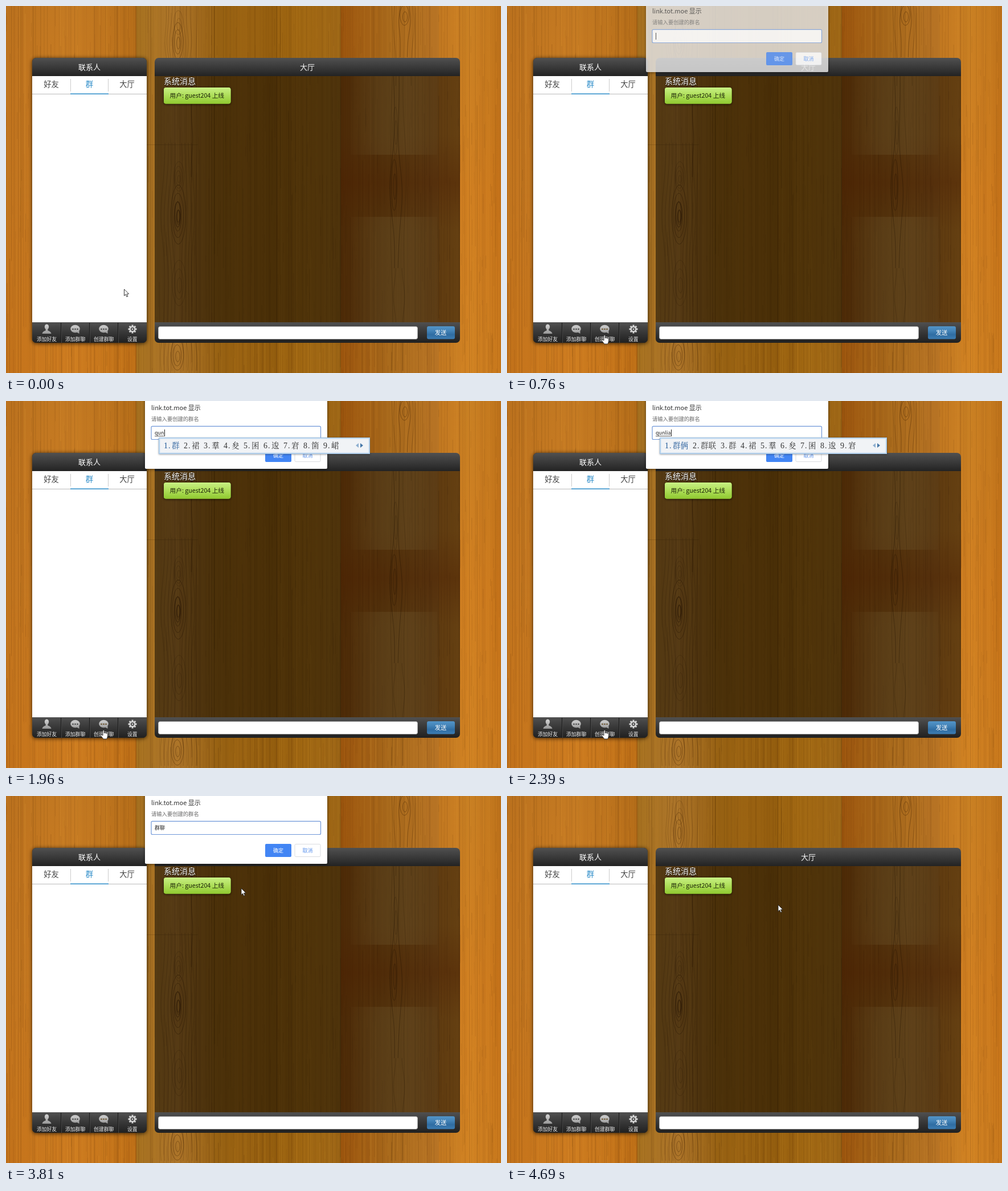
An HTML page with a canvas that plays this animation: 869 by 644 pixels, repeating every 6.33 s.

```html
<!DOCTYPE html>
<html lang="zh-CN">
<head>
<meta charset="utf-8">
<title>群聊</title>
<style>
html, body { margin: 0; width: 100%; height: 100%; overflow: hidden; background: #a5681a; }
canvas { display: block; }
</style>
</head>
<body>
<canvas id="stage" width="869" height="644"></canvas>
<script>
const W = 869, H = 644, LOOP = 6330;
const SANS = '"Noto Sans CJK SC", "Noto Sans", sans-serif';
const SERIF = '"Liberation Serif", "Noto Sans CJK SC", serif';
const view = document.getElementById('stage').getContext('2d');
let g = view;

let seed = 7;
const rnd = () => (seed = (seed * 16807) % 2147483647) / 2147483647;

function rect(x, y, w, h, fill) {
  g.fillStyle = fill;
  g.fillRect(x, y, w, h);
}

function round(x, y, w, h, r, fill, stroke) {
  g.beginPath();
  g.roundRect(x, y, w, h, r);
  if (fill) { g.fillStyle = fill; g.fill(); }
  if (stroke) { g.strokeStyle = stroke; g.stroke(); }
}

function ramp(x0, y0, x1, y1, ...stops) {
  const r = g.createLinearGradient(x0, y0, x1, y1);
  stops.forEach((s, i) => Array.isArray(s) ? r.addColorStop(s[0], s[1]) : r.addColorStop(i / (stops.length - 1), s));
  return r;
}

function shadow(color, blur, dy, draw) {
  g.save();
  g.shadowColor = color;
  g.shadowBlur = blur;
  g.shadowOffsetY = dy;
  draw();
  g.restore();
}

// y is the optical centre of the line
function text(str, x, y, size, color, align = 'left', font = SANS) {
  g.font = size + 'px ' + font;
  g.textAlign = align;
  g.fillStyle = color;
  g.fillText(str, x, y + size * 0.38);
}

function poly(points, fill, stroke) {
  g.beginPath();
  for (let i = 0; i < points.length; i += 2) g.lineTo(points[i], points[i + 1]);
  g.closePath();
  if (fill) { g.fillStyle = fill; g.fill(); }
  if (stroke) { g.strokeStyle = stroke; g.stroke(); }
}

// Grain lines that bulge around a knot, with rings inside it
function knot(cx, cy, rx, ry, rings, color) {
  g.strokeStyle = color;
  g.lineWidth = 0.9;
  for (let i = 1; i <= rings; i++) {
    const k = i / rings;
    g.beginPath();
    g.ellipse(cx + Math.sin(i * 2) * 0.6, cy - k * 6, rx * k, ry * k, 0, 0, Math.PI * 2);
    g.stroke();
  }
}

function strand(x, y0, y1, bulge, cy, spread, color) {
  g.strokeStyle = color;
  g.lineWidth = 0.9;
  g.beginPath();
  for (let y = y0; y <= y1; y += 5)
    g.lineTo(x + bulge * Math.exp(-(((y - cy) / spread) ** 2)) + Math.sin(y / 37 + x) * 1.2, y);
  g.stroke();
}

function wood() {
  const planks = [
    [0, 229, '#bf741f', '#cb7f25', '#b9701a'],
    [229, 365, '#a5701f', '#ad752a', '#986215'],
    [365, 476, '#956012', '#9b6312', '#935d0e'],
    [476, 588, '#99610f', '#a16813', '#9c6516'],
    [588, 760, '#9d560e', '#a96a1c', '#b87425'],
    [760, 869, '#c17720', '#cf8325', '#c3751c']
  ];
  for (const [a, b, ...c] of planks) rect(a, 0, b - a, H, ramp(a, 0, b, 0, ...c));
  rect(0, 0, 229, H, ramp(0, 0, 0, H, 'rgba(150,90,20,.12)', 'rgba(225,115,15,.05)', 'rgba(215,110,10,.2)'));
  rect(797, 0, 72, H, ramp(0, 0, 0, H, 'rgba(150,100,20,.1)', 'rgba(230,110,10,.12)', 'rgba(220,130,25,.15)'));
  for (let x = 0; x < W; x += 1.5) {
    const dark = rnd() < 0.6;
    const y = rnd() < 0.5 ? 0 : rnd() * H;
    rect(x, y, 0.6 + rnd(), H * (0.4 + rnd()), dark ? `rgba(70,35,0,${rnd() * 0.17})` : `rgba(255,190,80,${rnd() * 0.1})`);
  }
  for (let i = 0; i < 700; i++)
    rect(rnd() * W, rnd() * H, 0.8, 10 + rnd() * 55, `rgba(70,35,0,${rnd() * 0.15})`);
  for (const x of [228, 365, 475, 587]) rect(x, 0, 1, H, 'rgba(60,30,0,.25)');
  rect(247, 243, 90, 1, 'rgba(70,40,0,.22)');
  rect(588, 225, 209, 170, ramp(0, 225, 0, 395, 'rgba(150,55,0,0)', 'rgba(150,55,0,.32)', 'rgba(150,55,0,0)'));
  for (const [y, h] of [[91, 170], [370, 190]])
    rect(605, y, 152, h, ramp(605, 0, 757, 0, 'rgba(210,160,80,.05)', 'rgba(215,165,85,.32)', 'rgba(215,165,85,.38)', 'rgba(215,165,85,.12)'));

  const ink = 'rgba(65,32,0,.45)', soft = 'rgba(65,32,0,.25)';
  knot(302, 372, 13, 52, 4, ink);
  knot(302, 372, 5, 22, 2, 'rgba(50,22,0,.6)');
  knot(302, 67, 9, 32, 3, ink);
  knot(303, 35, 8, 21, 2, soft);
  knot(301, 617, 11, 28, 3, ink);
  knot(303, 305, 9, 26, 4, soft);
  knot(304, 492, 12, 40, 3, soft);
  for (let i = 1; i <= 4; i++) {
    strand(302 - i * 6, 240, 560, -5, 372, 60, soft);
    strand(302 + i * 6, 240, 560, 5, 372, 60, soft);
    strand(302 + i * 5, 0, 100, 4, 65, 30, soft);
    strand(302 - i * 5, 0, 100, -4, 65, 30, soft);
    strand(302 + i * 7, 560, H, 4, 617, 35, soft);
    strand(302 - i * 7, 560, H, -4, 617, 35, soft);
  }
  strand(325, 120, 300, 4, 235, 35, ink);
  strand(335, 0, H, -3, 430, 70, soft);

  knot(682, 320, 5, 45, 2, ink);
  knot(684, 225, 4, 42, 2, soft);
  knot(700, 22, 8, 18, 2, ink);
  for (const s of [-1, 1]) {
    strand(685 + s * 4, 120, 460, s * 6, 320, 60, ink);
    strand(688 + s * 10, 0, H, s * 4, 320, 90, soft);
    strand(699 + s * 6, 0, 91, s * 4, 25, 26, ink);
    strand(690 + s * 5, 460, H, s * 6, 510, 35, soft);
    strand(698 + s * 14, 0, 140, s * 4, 40, 40, soft);
  }
}

const bar = y => ramp(0, y, 0, y + 32, '#505050', '#3a3a3a', '#232323');

function person(x, y, fill) {
  g.fillStyle = fill;
  g.beginPath();
  g.ellipse(x, y - 4, 3.7, 4.6, 0, 0, 7);
  g.fill();
  rect(x - 1.8, y - 1, 3.6, 5, fill);
  g.beginPath();
  g.moveTo(x - 8, y + 8);
  g.quadraticCurveTo(x - 7.5, y + 4, x - 2, y + 2.5);
  g.lineTo(x + 2, y + 2.5);
  g.quadraticCurveTo(x + 7.5, y + 4, x + 8, y + 8);
  g.fill();
}

function bubble(x, y, fill, dots) {
  g.fillStyle = fill;
  g.beginPath();
  g.ellipse(x, y - 0.5, 8.3, 6.7, 0, 0, 7);
  g.fill();
  poly([x + 2, y + 5, x + 7, y + 3, x + 7, y + 8], fill);
  for (const d of [-4, 0, 4]) rect(x + d - 1, y - 1, 2, 2, dots);
}

function gear(x, y, fill) {
  g.save();
  g.translate(x, y);
  for (let i = 0; i < 8; i++) {
    rect(-1.5, -7.5, 3, 4, fill);
    g.rotate(Math.PI / 4);
  }
  g.strokeStyle = fill;
  g.lineWidth = 2.4;
  g.beginPath();
  g.arc(0, 0, 4.3, 0, 7);
  g.stroke();
  g.beginPath();
  g.arc(0, 0, 1.5, 0, 7);
  g.fill();
  g.restore();
}

function contacts() {
  shadow('rgba(0,0,0,.75)', 7, 1, () => round(46, 91, 201, 500, 7, '#222'));
  round(46, 91, 201, 32, [7, 7, 0, 0], bar(91));
  rect(46, 123, 201, 432, '#fff');
  text('联系人', 146.5, 107, 13, '#fff', 'center');
  text('好友', 79.5, 137, 13.3, '#444', 'center');
  text('群', 146.3, 137, 13.3, '#2b8bc8', 'center');
  text('大厅', 212.5, 137, 13.3, '#444', 'center');
  rect(113, 128, 1, 22, '#ccc');
  rect(179, 128, 1, 22, '#ccc');
  rect(46, 154, 201, 1, '#bbb');
  rect(113, 153.5, 67, 1.5, '#2b8bc8');

  round(46, 555, 201, 36, [0, 0, 7, 7], ramp(0, 555, 0, 591, '#505050', '#373737', '#202020'));
  for (const x of [96, 146, 196]) {
    rect(x, 556, 1, 35, '#1b1b1b');
    rect(x + 1, 556, 1, 35, '#484848');
  }
  const tone = ramp(0, 559, 0, 576, '#d2d2d2', '#949494');
  person(71.5, 567, tone);
  bubble(121.5, 567, tone, '#333');
  bubble(171.5, 567, tone, '#333');
  gear(222, 567, tone);
  ['添加好友', '添加群聊', '创建群聊', '设置'].forEach((s, i) => text(s, 71.5 + i * 50.1, 585, 8.8, '#eee', 'center'));
}

function chat() {
  rect(261, 123, 536, 432, 'rgba(0,0,0,.5)');
  round(261, 91, 536, 32, [7, 7, 0, 0], bar(91));
  text('大厅', 529, 107, 13, '#f4f4f4', 'center');
  shadow('#000', 2, 1, () => text('系统消息', 277, 132, 14, '#fff'));
  shadow('rgba(0,0,0,.7)', 4, 1, () => round(277, 143, 117.5, 28.5, 4, '#9c3'));
  round(277, 143, 117.5, 28.5, 4, ramp(0, 143, 0, 171, '#c8f084', '#aede59', '#91ca32'));
  text('用户: guest204 上线', 287.5, 157.3, 10.7, '#1c2408');
  round(261, 555, 536, 36, [0, 0, 7, 7], ramp(0, 555, 0, 591, '#505050', '#373737', '#202020'));
  g.lineWidth = 1;
  round(267.5, 562.5, 455, 22, 3, '#fff', '#aaa');
  round(739, 562, 49, 22.5, 3, ramp(0, 562, 0, 584, '#5294c8', '#4585b9', '#2f6da3', '#3c7cb2'));
  text('发送', 763, 573.3, 10.3, '#fff', 'center');
}

function buildScene() {
  const c = document.createElement('canvas');
  c.width = W;
  c.height = H;
  g = c.getContext('2d');
  wood();
  contacts();
  chat();
  g = view;
  return c;
}

// Value of the last step at or before t
const at = (steps, t) => steps.reduce((v, s) => s[0] <= t ? s : v, steps[0]);

// time, opacity, vertical offset
const FADE = [[0, 0, 0], [650, 0.04, -10], [760, 0.75, -3], [870, 1, 0], [4490, 0.99, -2.6], [4590, 0.25, -8], [4690, 0, 0]];

// time, typed text, candidates
const TYPING = [
  [0, '', ''],
  [1630, 'q', '去 前 请 起 其实 全 却 其他 群'],
  [1730, 'qu', '去 区 取 曲 趣 渠 屈 驱 娶'],
  [1960, 'qun', '群 裙 羣 夋 囷 逡 宭 箘 峮'],
  [2160, 'qunl', '群里 群落 群龙 群狼 群岭 群乱 群雷 群楼 群林'],
  [2270, 'qunli', '群里 群力 群立 群离 群 裙 羣 夋 囷'],
  [2380, 'qunlia', '群俩 群联 群 裙 羣 夋 囷 逡 宭'],
  [2490, 'qunliao', '群聊 群僚 群撩 裙撩 群寥 群疗 群 裙 羣'],
  [3030, '群聊', '']
];

// time, caret shown
const CARET = [[0, 1], [1200, 0], [1630, 1], [3470, 0], [3930, 1], [4370, 0]];

// time, x, y, hand
const POINTER = [
  [0, 207.5, 497, 0], [100, 196, 522, 0], [210, 176, 566, 1], [310, 170, 577.5, 1],
  [3250, 190, 545, 0], [3360, 235, 470, 0], [3470, 290, 380, 0], [3590, 348, 275, 0], [3700, 392, 195, 0], [3810, 413, 162, 0],
  [3930, 432, 138, 0], [4040, 452, 115, 0], [4150, 466, 100, 0], [4260, 472, 95, 0], [4370, 473, 93.5, 0],
  [4590, 474, 112, 0], [4690, 476, 191, 0]
];

function picker(words) {
  const list = words.split(' ');
  const wide = 54 + list.length * 35 + (words.replace(/ /g, '').length - list.length) * 14;
  shadow('rgba(0,0,0,.35)', 3, 1, () => rect(268, 64, wide + 2, 29, '#9fc3e6'));
  rect(269, 65, wide, 27, '#c5dcf1');
  rect(270.5, 66.5, wide - 3, 24, '#f1f3f6');
  let x = 277;
  list.forEach((word, i) => {
    const color = i ? '#333' : '#1c5596';
    text(i + 1, x, 78, 14, color, 'left', SERIF);
    text('.', x + 8, 78, 14, color, 'left', SERIF);
    text(word, x + 14, 78, 13.6, color, 'left', '"Noto Serif CJK SC", "Noto Sans CJK SC", serif');
    x += 21 + word.length * 14;
  });
  const r = 268 + wide - 9;
  poly([r - 14, 78, r - 9, 74, r - 9, 82], '#8eafd0');
  poly([r - 1, 78, r - 6, 74, r - 6, 82], '#4778a8');
}

function dialog(t) {
  const [, alpha, dy] = at(FADE, t);
  if (!alpha) return;
  const [, typed, words] = at(TYPING, t);
  g.save();
  g.globalAlpha = alpha;
  g.translate(0, dy);
  shadow('rgba(0,0,0,.55)', 5, 1, () => round(244, -12, 320, 131, 2, '#fff'));
  text('link.tot.moe 显示', 255, 12, 11, '#333');
  text('请输入要创建的群名', 255, 31.5, 9.3, '#666');
  g.lineWidth = 1.2;
  round(255, 44.3, 297.5, 23.2, 2, '#fff', '#6f97d8');
  text(typed, 261, 56, 9, '#222');
  const end = 261 + g.measureText(typed).width;
  if (words) rect(261, 61, end - 261, 0.8, '#333');
  if (at(CARET, t)[1]) rect(Math.round(end), 50, 1, 12, '#222');
  round(455, 84, 46, 23, 2, '#4285f4');
  text('确定', 478, 96, 9, '#fff', 'center');
  g.lineWidth = 1;
  round(507, 84.5, 45, 22, 2, '#fff', '#dadce0');
  text('取消', 529.5, 96, 9, '#5a91ec', 'center');
  if (words) picker(words);
  g.restore();
}

function pointer(t) {
  const [, x, y, hand] = at(POINTER, t);
  g.save();
  g.translate(x, y);
  g.lineWidth = 0.9;
  g.lineJoin = 'round';
  if (hand) {
    poly([0, 1, 1.2, 0, 2.4, 1, 2.4, 5, 5, 5, 7.6, 6, 8.5, 8, 8, 12.5, 6.8, 15.5, 1, 15.5, -3.8, 9.5, -2.8, 8, 0, 9.5], '#fff', '#333');
  } else {
    poly([0, 0, 0, 11.4, 2.6, 9, 4.4, 13.3, 6.4, 12.4, 4.6, 8.3, 8.1, 8.1], '#fff', '#222');
  }
  g.restore();
}

const scene = buildScene();
const start = performance.now();

function frame() {
  const t = (performance.now() - start) % LOOP;
  g.drawImage(scene, 0, 0);
  if (t >= 530) for (const d of [-4, 0, 4]) rect(170.5 + d, 566, 2, 2, '#75592a');
  dialog(t);
  pointer(t);
  requestAnimationFrame(frame);
}
frame();
</script>
</body>
</html>
```
